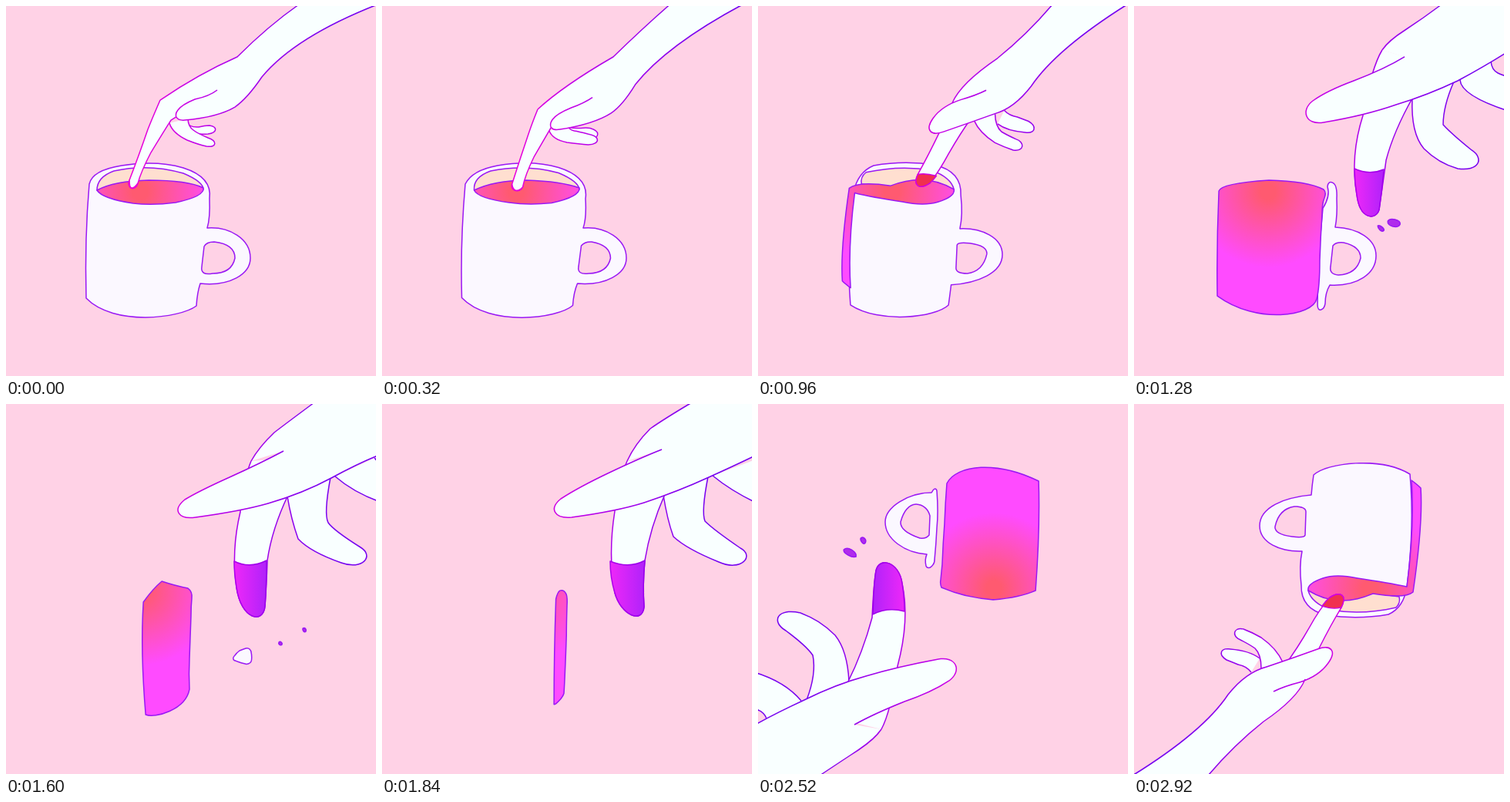
Animation of 480x480 px, one loop 3000 ms. Source, as an HTML page without scripts:

```html
<!DOCTYPE html>
<html lang="en">
<head>
<meta charset="utf-8">
<title>Stirred cup</title>
<style>
html, body { margin: 0; height: 100%; overflow: hidden; background: #ffd2e6; }
svg { display: block; width: 100%; height: 100%; }

/* Each part has poses a to h; the second half runs them backwards, upside down. */
path {
  --a: path("M0 0"); --b: path("M0 0"); --c: path("M0 0"); --d: path("M0 0");
  --e: path("M0 0"); --f: path("M0 0"); --g: path("M0 0"); --h: var(--g);
  stroke: #9a18f4; stroke-width: 1.5; stroke-linejoin: round;
  animation: morph 3s linear infinite;
}
@keyframes morph {
  0% { d: var(--a); }
  21.333% { d: var(--b); }
  33.333% { d: var(--c); }
  42.667% { d: var(--d); }
  46.667% { d: var(--e); }
  53.333% { d: var(--f); }
  60% { d: var(--g); }
  65.333% { d: var(--h); }
  70.667% { d: var(--g); }
  77.333% { d: var(--f); }
  84% { d: var(--e); }
  88% { d: var(--d); }
  97.333%, 100% { d: var(--c); }
}
#scene { transform-origin: 240px 240px; animation: flip 3s step-end infinite; }
@keyframes flip {
  0% { transform: none; }
  65.333%, 100% { transform: rotate(180deg); }
}
#stain stop { animation: tint 3s linear infinite; }
@keyframes tint {
  0%, 33.333%, 97.333%, 100% { stop-color: #f0304f; }
  42.667%, 88% { stop-color: var(--dye); }
}
.skin path { fill: #f9ffff; stroke: url(#line); }
.skin #dip { fill: url(#stain); }
.drop { fill: #b02cec; }

#shell {
  fill: #fbf8ff;
  --a: path("M104 379 Q102 300 108 231 Q112 213 150 207 Q195 200 230 210 Q268 222 264 250 Q265 275 261 288 C290 286 317 302 317 327 C317 348 290 364 252 360 Q248 372 247 389 C226 405 140 416 104 379Z");
  --b: path("M103 378 Q101 310 108 231 Q122 213 150 207 Q195 199 228 209 Q269 222 264 250 Q266 275 261 288 C290 285 317 303 317 327 C317 347 290 362 255 360 Q249 372 248 388 C230 406 140 417 103 378Z");
  --c: path("M122 389 Q116 320 126 243 Q130 216 150 207 Q190 200 230 206 Q264 214 263 245 Q266 270 262 289 C290 288 317 300 317 322 C317 346 285 359 250 362 Q249 375 247 388 C230 404 160 412 122 389Z");
  --d: path("M238 388 Q238 330 245 262 Q255 246 251 234 Q252 226 258 229 Q264 232 263 250 Q264 272 261 287 C290 288 314 302 314 324 C314 347 290 364 254 362 Q248 372 248 386 C247 394 238 399 238 388Z");
  --e: path("M248 366 Q246 340 248 320 Q249 298 251 278 Q251 272 257 268 Q261 267 262 270 Q264 278 261 285 C290 287 315 305 315 327 C315 346 285 365 255 365 Q254 366 253 368 C251 371 248 370 248 366Z");
  --f: path("M295 331 Q294 329 297 326 Q299 323 303 320 Q308 318 311 317 Q314 316 316 318 Q318 320 318 322 C319 326 319 332 318 334 C317 337 312 338 310 337 Q305 336 300 334 C298 333 295 333 295 331Z");
}
#hole {
  fill: #ffd2e6;
  --a: path("M257 312 Q260 306 270 306 Q297 309 297 327 Q293 347 268 347 Q252 350 254 338Z");
  --b: path("M260 310 Q266 305 274 306 Q295 311 296 327 Q292 346 268 347 Q254 348 256 338Z");
  --c: path("M258 310 Q259 306 275 308 Q298 311 297 321 Q292 344 272 347 Q257 347 257 340Z");
  --d: path("M258 311 Q262 306 272 307 Q294 312 294 327 Q289 348 265 349 Q253 348 255 338Z");
  --e: path("M258 310 Q262 305 270 306 Q296 315 295 327 Q289 349 275 350 Q261 349 257 335Z");
  --f: path("M308 328 Q308 328 308 328 Q308 328 308 328 Q308 328 308 328 Q308 328 308 328Z");
}
#wall {
  fill: #ffdfd0;
  --a: path("M118 239 Q118 222 140 214 Q185 204 230 217 Q256 228 256 238 Q190 250 118 239Z");
  --b: path("M121 238 Q119 222 142 214 Q187 206 228 216 Q254 227 256 238 Q190 248 121 238Z");
  --c: path("M136 230 Q134 222 140 216 Q185 206 225 213 Q250 222 254 238 Q200 240 136 230Z");
  --d: path("M257 240 Q257 240 257 240 Q257 240 257 240 Q257 240 257 240 Q257 240 257 240Z");
}
#tea {
  fill: url(#brew);
  --a: path("M118 239 Q118 239 118 239 Q140 227 185 226 Q236 226 256 236 Q258 247 220 255 Q190 259 165 256 Q125 250 118 239 Q118 239 118 239 C118 239 118 239 118 239Z");
  --b: path("M121 239 Q121 239 121 239 Q150 226 190 226 Q230 229 256 236 Q256 248 220 256 Q190 258 165 254 Q124 249 121 239 Q121 239 121 239 C121 239 121 239 121 239Z");
  --c: path("M108 371 Q105 325 118 236 Q128 227 170 234 Q215 214 254 238 Q256 247 235 254 Q218 260 190 254 Q150 248 126 243 Q116 320 120 381 C116 378 112 375 108 371Z");
  --d: path("M108 376 Q107 310 110 240 Q113 230 175 226 Q225 227 246 238 Q250 242 247 249 Q244 256 244 270 Q242 300 241 330 Q241 365 237 380 C232 402 160 414 108 376Z");
  --e: path("M116 380 Q114 320 120 238 Q140 229 175 226 Q212 229 242 242 Q244 247 243 252 Q242 262 241 272 Q240 300 238 325 Q237 352 235 377 C222 402 170 406 116 380Z");
  --f: path("M181 403 Q174 320 178 257 Q190 240 202 230 Q220 236 236 239 Q242 243 241 252 Q240 262 240 275 Q239 300 238 330 Q237 350 238 370 C233 397 193 408 181 403Z");
  --g: path("M218 396 Q218 325 221 252 Q224 240 228 238 Q235 236 239 244 Q241 250 240 262 Q239 285 239 300 Q238 330 237 345 Q236 365 235 377 C233 384 222 396 218 396Z");
  --h: path("M238 372 Q238 320 239 256 Q239 254 239 254 Q239 254 239 254 Q240 256 240 262 Q240 285 240 300 Q239 330 239 345 Q239 360 239 370 C239 371 238 372 238 372Z");
}
#drop1 {
  --c: path("M224 224 C224 224 224 224 224 224 C224 224 224 224 224 224Z");
  --d: path("M329 279 C332 274 346 277 345 283 C342 289 328 286 329 279Z");
  --e: path("M353 282 C358 280 370 286 369 291 C364 296 352 289 353 282Z");
  --f: path("M385 291 C388 289 390 293 389 295 C387 297 384 294 385 291Z");
  --g: path("M400 297 C400 297 400 297 400 297 C400 297 400 297 400 297Z");
}
#drop2 {
  --c: path("M222 226 C222 226 222 226 222 226 C222 226 222 226 222 226Z");
  --d: path("M316 285 C319 283 325 289 324 291 C321 294 316 289 316 285Z");
  --e: path("M341 300 C343 296 348 303 347 306 C343 309 339 304 341 300Z");
  --f: path("M354 309 C356 307 359 310 358 312 C355 314 353 311 354 309Z");
  --g: path("M364 316 C364 316 364 316 364 316 C364 316 364 316 364 316Z");
}
#ring {
  --a: path("M234 150 Q238 158 250 157 Q258 155 264 155 C275 157 274 164 262 166 Q248 167 240 164");
  --b: path("M250 164 Q258 160 265 160 Q272 160 276 162 C293 168 290 178 278 180 Q268 181 260 177");
  --c: path("M328 132 Q334 140 345 142 Q352 145 360 148 C371 155 368 164 355 162 Q330 160 317 150");
  --d: path("M463 72 Q464 83 472 87 Q478 90 490 93 C500 100 500 135 485 136 Q424 116 423 96");
  --e: path("M469 72 Q472 80 480 83 Q484 86 492 90 C500 98 500 130 485 132 Q445 120 424 95");
  --f: path("M478 70 Q484 78 490 80 Q494 84 496 88 C504 96 500 125 485 127 Q450 114 427 94");
  --g: path("M490 70 Q494 78 496 80 Q498 84 500 88 C504 96 500 125 485 128 Q452 112 429 93");
}
#mid {
  --a: path("M212 152 Q216 165 235 174 Q250 180 260 182 C274 184 274 175 262 171 Q248 165 243 161 Q236 156 236 146");
  --b: path("M222 172 Q226 181 245 180 Q262 178 275 178 C294 174 292 163 272 161 Q262 161 256 163 Q250 165 246 166");
  --c: path("M287 145 Q295 163 315 177 Q327 184 338 188 C352 191 353 178 342 174 Q330 168 323 163 Q315 155 315 137");
  --d: path("M361 120 Q359 165 376 185 Q395 204 420 211 C447 215 455 198 438 187 Q412 166 401 154 Q401 130 415 98");
  --e: path("M362 120 Q364 160 380 180 Q400 200 425 209 C455 216 464 198 444 186 Q417 166 409 154 Q404 130 417 96");
  --f: path("M365 120 Q370 150 379 175 Q395 192 435 206 C463 216 478 197 460 186 Q425 164 418 154 Q412 143 421 95");
  --g: path("M365 118 Q370 150 378 172 Q395 188 437 205 C466 218 484 197 465 187 Q430 163 419 152 Q414 140 423 94");
}
#index {
  --a: path("M200 122 Q190 145 184 160 Q172 195 160 226 C156 238 168 240 171 230 Q175 215 188 190 Q205 162 214 148 L290 100");
  --b: path("M204 146 Q199 160 195 175 Q185 205 177 237 C178 244 190 244 194 240 Q196 224 207 200 Q216 183 224 168 L290 120");
  --c: path("M258 123 Q250 145 240 163 Q225 193 211 216 C203 232 212 238 226 229 Q240 213 252 191 Q268 163 285 140 L310 105");
  --d: path("M322 57 Q308 80 297 142 Q280 195 289 245 C293 278 314 278 318 264 Q322 235 327 200 Q337 162 362 118 L365 70");
  --e: path("M320 58 Q308 80 299 140 Q283 200 293 247 C297 276 323 282 327 264 Q330 248 332 203 Q344 158 364 118 L368 70");
  --f: path("M318 74 Q309 95 304 140 Q292 190 299 238 C305 280 334 286 336 262 Q338 235 339 203 Q345 162 366 118 L370 70");
  --g: path("M318 74 Q309 95 302 139 Q293 195 302 245 C310 274 338 286 340 263 Q338 235 341 203 Q348 160 367 117 L370 70");
}
#dip {
  --a: path("M160 226 Q160 244 171 230 Q171 230 171 230 C168 240 156 238 160 226 Q160 226 160 226Z");
  --b: path("M177 237 Q183 247 194 240 Q194 240 194 240 C190 244 178 244 177 237 Q177 237 177 237Z");
  --c: path("M212 216 Q222 213 236 218 Q231 225 226 229 C212 238 203 232 211 216 Q211 216 212 216Z");
  --d: path("M286 211 Q305 220 324 212 Q322 238 318 264 C314 278 293 278 289 245 Q286 228 286 211Z");
  --e: path("M290 211 Q312 217 331 207 Q330 248 327 264 C323 282 297 276 293 247 Q290 228 290 211Z");
  --f: path("M296 204 Q316 214 338 203 Q338 235 336 262 C334 286 305 280 299 238 Q296 220 296 204Z");
  --g: path("M296 204 Q320 214 341 203 Q338 235 340 263 C338 286 310 274 302 245 Q296 225 296 204Z");
}
#hand {
  --a: path("M274 109 Q264 117 245 121 Q228 128 223 135 C217 143 222 149 232 148 Q275 144 297 131 Q313 120 332 92 Q375 40 482 -2 L482 -4 L380 -2 Q340 26 300 66 Q250 88 200 122");
  --b: path("M272 128 Q262 134 246 143 Q224 152 219 160 C213 170 219 175 230 172 Q275 162 297 147 Q311 138 325 112 Q363 62 454 -2 L454 -4 L367 -2 Q335 33 300 66 Q220 119 204 146");
  --c: path("M299 107 Q285 114 265 119 Q240 127 228 144 C216 161 226 168 242 162 Q275 150 308 139 Q335 132 358 103 Q390 55 482 -2 L482 -4 L384 -2 Q350 38 312 68 Q268 98 258 123");
  --d: path("M351 66 Q325 82 285 97 Q250 110 232 123 C216 135 222 155 246 151 Q300 142 340 128 Q380 116 420 97 Q455 78 482 61 L482 -4 L399 -2 Q375 16 352 31 Q330 45 322 57");
  --e: path("M355 64 Q330 78 290 94 Q255 106 232 121 C214 135 224 153 246 149 Q300 139 340 127 Q380 116 420 96 Q455 80 482 65 L482 -4 L400 -2 Q370 18 350 31 Q328 46 320 58");
  --f: path("M360 61 Q330 77 290 95 Q250 113 232 124 C215 138 224 150 246 147 Q305 139 340 129 Q385 116 422 96 Q455 78 482 67 L482 -4 L400 -2 Q365 24 348 37 Q328 56 318 74");
  --g: path("M363 59 Q335 70 295 89 Q255 108 232 123 C216 136 224 149 246 147 Q305 139 340 128 Q385 113 424 95 Q455 81 482 68 L482 -4 L402 -2 Q365 20 348 32 Q328 52 318 74");
}
</style>
</head>
<body>
<svg viewBox="0 0 480 480">
  <defs>
    <radialGradient id="brew" gradientUnits="userSpaceOnUse" cx="174" cy="241" r="98">
      <stop offset=".1" stop-color="#ff5a70"/>
      <stop offset="1" stop-color="#ff4bff"/>
    </radialGradient>
    <linearGradient id="line" gradientUnits="userSpaceOnUse" x1="160" y1="0" x2="420" y2="0">
      <stop offset="0" stop-color="#ee00d8"/>
      <stop offset=".35" stop-color="#c000e8"/>
      <stop offset="1" stop-color="#7600f0"/>
    </linearGradient>
    <linearGradient id="stain">
      <stop offset="0" style="--dye:#ee28f8"/>
      <stop offset="1" style="--dye:#b022fa"/>
    </linearGradient>
  </defs>
  <g id="scene">
    <path id="shell"/>
    <path id="hole"/>
    <path id="wall"/>
    <path id="tea"/>
    <path id="drop1" class="drop"/>
    <path id="drop2" class="drop"/>
    <g class="skin">
      <path id="ring"/>
      <path id="mid"/>
      <path id="index"/>
      <path id="dip"/>
      <path id="hand"/>
    </g>
  </g>
</svg>
</body>
</html>
```
